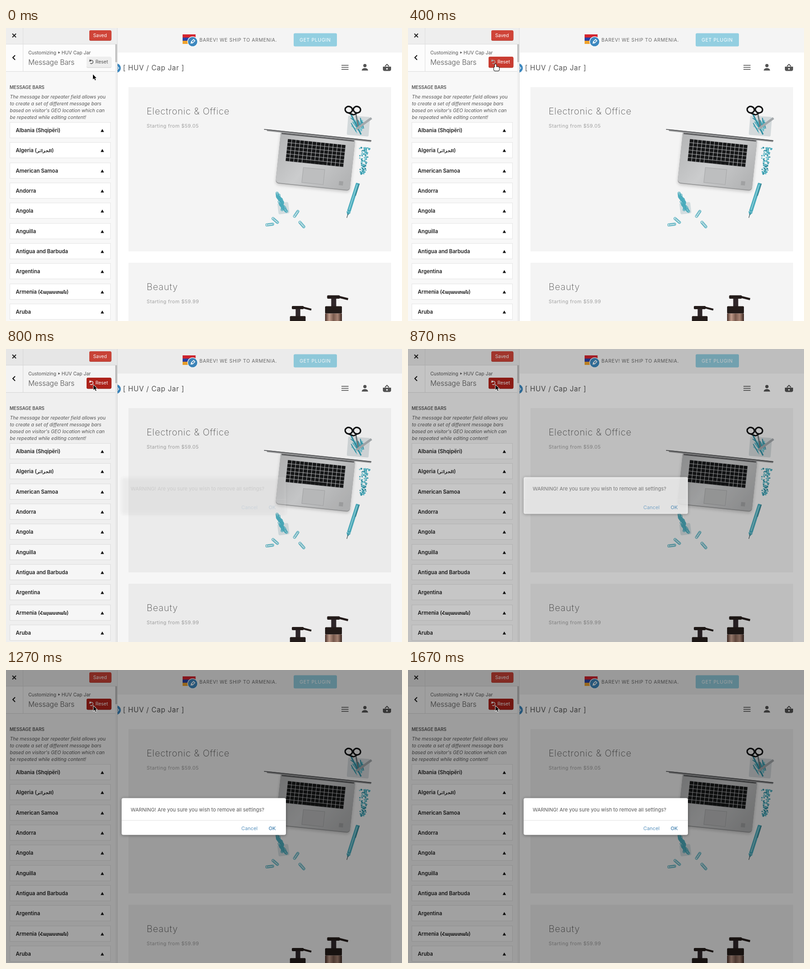
These frames come from a looping animation (870 px wide and 644 px high, 1740 ms). An HTML page with a canvas:

```html
<!DOCTYPE html>
<html lang="en">
<head>
<meta charset="utf-8">
<title>Message bars reset</title>
<style>
html, body { margin: 0; width: 100%; height: 100%; overflow: hidden; background: #fff; }
canvas { display: block; width: 870px; height: 644px; }
</style>
</head>
<body>
<canvas id="stage" width="870" height="644"></canvas>
<script>
const ctx = document.getElementById('stage').getContext('2d');
const W = 870, H = 644, SIDE = 245, LOOP = 1740, TICK = 1000 / 15;
const FONT = 'Inter, "Noto Sans", "DejaVu Sans", sans-serif';
const INK = '#555', TEALS = ['#2f8fa2', '#4aabbc', '#7cc6d1'];

const clamp = v => Math.max(0, Math.min(1, v));
const lerp = (a, b, k) => a + (b - a) * k;
const easeOut = k => 1 - (1 - clamp(k)) ** 1.6;
const easeInOut = k => (1 - Math.cos(Math.PI * clamp(k))) / 2;

function seeded(seed) {
  return () => (seed = (seed * 16807) % 2147483647) / 2147483647;
}

// Drawing helpers

function text(str, x, y, size, color = INK, weight = 400, spacing = 0) {
  ctx.font = `${weight} ${size}px ${FONT}`;
  ctx.letterSpacing = spacing + 'px';
  ctx.fillStyle = color;
  ctx.fillText(str, x, y);
  return x + ctx.measureText(str).width;
}

function rect(x, y, w, h, color, r = 0) {
  ctx.beginPath();
  ctx.roundRect(x, y, w, h, r);
  ctx.fillStyle = color;
  ctx.fill();
}

function line(x1, y1, x2, y2, color, width = 1) {
  ctx.beginPath();
  ctx.moveTo(x1, y1);
  ctx.lineTo(x2, y2);
  ctx.strokeStyle = color;
  ctx.lineWidth = width;
  ctx.stroke();
}

function oval(x, y, rx, ry, color, from = 0) {
  ctx.beginPath();
  ctx.ellipse(x, y, rx, ry, 0, from, Math.PI * 2);
  ctx.fillStyle = color;
  ctx.fill();
}

const disc = (x, y, r, color) => oval(x, y, r, r, color);

function at(x, y, angle, draw, scale = 1) {
  ctx.save();
  ctx.translate(x, y);
  ctx.rotate(angle);
  ctx.scale(scale, scale);
  draw();
  ctx.restore();
}

// Points along +x before rotation.
function triangle(x, y, r, angle, color) {
  at(x, y, angle, () => {
    ctx.beginPath();
    ctx.moveTo(r, 0);
    ctx.lineTo(-r * 0.7, -r);
    ctx.lineTo(-r * 0.7, r);
    ctx.fillStyle = color;
    ctx.fill();
  });
}

function chevron(x, y, r, angle, color, width) {
  at(x, y, angle, () => {
    ctx.beginPath();
    ctx.moveTo(-r / 2, -r);
    ctx.lineTo(r / 2, 0);
    ctx.lineTo(-r / 2, r);
    ctx.strokeStyle = color;
    ctx.lineWidth = width;
    ctx.stroke();
  });
}

function shadow(blur, dy, alpha, draw) {
  ctx.save();
  ctx.shadowColor = `rgba(0,0,0,${alpha})`;
  ctx.shadowBlur = blur;
  ctx.shadowOffsetY = dy;
  draw();
  ctx.restore();
}

function gradient(x, y, ...colors) {
  const g = ctx.createLinearGradient(0, 0, x, y);
  colors.forEach((c, i) => g.addColorStop(i / (colors.length - 1), c));
  return g;
}

// Sidebar

const countries = [
  ['Albania (Shqipëri)'], ['Algeria', 'الجزائر'], ['American Samoa'], ['Andorra'],
  ['Angola'], ['Anguilla'], ['Antigua and Barbuda'], ['Argentina'],
  ['Armenia', 'Հայաստան'], ['Aruba']
];

const notes = [
  'The message bar repeater field allows you',
  'to create a set of different message bars',
  "based on visitor's GEO location which can",
  'be repeated while editing content!'
];

function countryRow([name, native], i) {
  const y = Math.round(207 + i * 44.35), base = y + 21.5;
  rect(8, y, 222, 35, '#e4e4e4');
  rect(9, y + 1, 220, 33, '#fff');
  let x = text(native ? name + ' (' : name, 21.5, base, 11.3, '#222', 600);
  if (native) {
    x = text(native, x, base, 9.8, '#222', 700);
    text(')', x, base, 11.3, '#222', 600);
  }
  triangle(211.6, y + 18.8, 3.7, -Math.PI / 2, '#111');
}

function resetButton(tick) {
  const hover = tick >= 4, pressed = tick >= 10;
  const [face, edge] = pressed ? ['#b3231b', '#8f1b14'] : hover ? ['#c93c31', '#a93429'] : ['#eee', '#cfcfcf'];
  rect(177, 64, 54.5, 23.5, edge, 3);
  rect(177, 63, 54.5, 23.5, face, 3);
  const shade = lerp(85, 255, hover ? clamp((tick - 3) / 6) : 0);
  const color = `rgb(${shade},${shade},${shade})`;
  ctx.beginPath();
  ctx.arc(187.5, 74.5, 3.7, -2.3, 2.3);
  ctx.strokeStyle = color;
  ctx.lineWidth = 1.5;
  ctx.stroke();
  triangle(184.6, 72, 2.8, 2.4, color);
  text('Reset', 196.5, 77.7, 10.4, hover ? '#fff' : INK);
}

function sidebar(tick) {
  rect(0, 0, SIDE, H, '#f8f8f8');
  rect(0, 0, SIDE, 35, '#eee');
  rect(0, 36, 240, 59, '#fcfcfc');
  [35, 95].forEach(y => rect(0, y, SIDE, 1, '#dcdcdc'));
  rect(37, 0, 1, 95, '#dedede');
  [1, -1].forEach(s => line(14, 16.5 - 4 * s, 22, 16.5 + 4 * s, '#222', 2));
  chevron(17.5, 65, 5, Math.PI, '#111', 2);

  text('Customizing', 49, 57.5, 10.45);
  triangle(116.5, 54, 2.4, 0, INK);
  text('HUV Cap Jar', 122, 57.5, 10.45);
  text('Message Bars', 49, 80.5, 15.4, INK, 300);
  rect(183, 6, 48.5, 22, '#b33a30', 3);
  rect(183, 5, 48.5, 22, '#cf4438', 3);
  text('Saved', 191.5, 20.2, 10.3, '#fff');
  resetButton(tick);

  text('MESSAGE BARS', 8, 134, 9.8, INK, 600);
  notes.forEach((s, i) => text(s, 8.5, 155.3 + i * 14.8, 10.42, INK, 'italic 400'));
  countries.forEach(countryRow);

  rect(240, 36, 5, H, '#f0f0f0');
  rect(240, 36, 4, 39, '#c4c4c4');
  rect(244, 0, 1, H, '#dcdcdc');
}

// Store header

function badge(x, y) {
  disc(x, y, 11.5, '#fff');
  disc(x, y, 10.3, '#3d88bf');
}

function topBar() {
  rect(SIDE, 0, W, 54, '#f4f4f4');
  ['#d3252f', '#2a42a5', '#f0a32c'].forEach((c, i) => rect(388, 14 + i * 7, 28.5, 7, c));
  badge(410, 30);
  at(410, 30, Math.PI * 0.75, () => {
    ctx.strokeStyle = '#fff';
    ctx.strokeRect(-5, -2, 7, 4);
    triangle(4, 0, 2.5, 0, '#fff');
  });
  text('BAREV! WE SHIP TO ARMENIA.', 425, 29.7, 10.3, '#666', 400, 0.7);
  rect(632, 11.5, 95, 29, '#93cfe1', 3);
  text('GET PLUGIN', 645, 29.7, 10.3, '#fff', 400, 0.7);
}

function header() {
  badge(242, 88);
  chevron(246.5, 88, 3, 0, '#fff', 1.3);
  text('[ HUV / Cap Jar ]', 257, 93, 15.2, INK, 400, 0.7);
  for (let y = 82; y < 92; y += 4.5) line(737, y, 752.5, y, INK, 1.6);
  disc(788.5, 82.6, 3.6, INK);
  oval(788.5, 93.5, 7, 5.5, INK, Math.PI);
  rect(828, 85, 18, 9.5, INK, [0, 0, 4, 4]);
  chevron(837, 82, 4.5, -Math.PI / 2, INK, 1.8);
  disc(837, 89.8, 1.8, '#fff');
}

function card(y, h, title, price) {
  rect(269, y, 577, h, '#f4f4f4');
  text(title, 309, y + 60, 20, INK, 200, 0.8);
  text('Starting from ' + price, 309, y + 88.6, 10.8, '#a2a2a2', 400, 0.45);
}

// Product pictures

function laptop() {
  ctx.save();
  ctx.transform(1, 0.104, -0.107, 1, 604, 229);
  shadow(7, 3, 0.2, () => rect(0, 0, 163, 112, '#8f9091', [0, 0, 7, 7]));
  rect(0, 0, 163, 110.5, gradient(150, 100, '#b4b5b6', '#cbcccd', '#b3b4b5'), [0, 0, 7, 7]);
  rect(2, 1, 159, 3, '#5c5d5f');
  const kw = 127.5 / 14, kh = 49 / 6;
  rect(16.5, 13, 14 * kw, 6 * kh, '#909193');
  for (let r = 0; r < 6; r++) {
    for (let c = 0; c < 14; c++) {
      const space = r === 5 && c > 3 && c < 9;
      rect(17 + c * kw, 13.5 + r * kh, space ? kw : kw - 1.3, kh - 1.3, '#161718', 0.8);
    }
  }
  rect(56.5, 71, 48, 34, '#a5a6a7');
  rect(57.5, 72, 46, 32, '#bdbebf');
  rect(138, 93, 9, 9, '#a0a1a2');
  ctx.restore();

  at(567, 222, 0.105, () => {
    rect(6, 0, 231, 4, '#9a9b9c', 2);
    rect(0, 0, 237, 1.6, '#4d4e50');
  });
}

function penCup() {
  const rnd = seeded(31);
  at(752, 192, 0.08, () => rect(0, 0, 48, 43, 'rgba(200,208,211,.75)', 3));
  for (let i = 0; i < 26; i++) {
    const x = 757 + rnd() * 28, y = 196 + rnd() * 20;
    line(x, y, lerp(x, 777, 0.6) + rnd() * 8, y + 10 + rnd() * 10, TEALS[i % 3], 1.7);
  }
  line(757, 188, 780, 234, TEALS[0], 3);
  line(768, 186, 774, 216, '#6d777b', 3);
  line(803, 198, 770, 222, '#a4a9ac', 5);
  for (const x of [753, 771]) {
    ctx.beginPath();
    ctx.ellipse(x, 179.5, 8, 7, 0.2, 0, 7);
    ctx.strokeStyle = '#121314';
    ctx.lineWidth = 3.2;
    ctx.stroke();
    line(x, 187, 764, 191, '#121314', 3);
  }
}

function beads() {
  const rnd = seeded(77);
  for (let i = 0; i < 110; i++) {
    const k = rnd() ** 1.2, spread = 13 - 6 * k;
    const x = lerp(789, 783, k) + (rnd() + rnd() - 1) * spread;
    disc(x, lerp(263, 321, k), 1.1 + rnd() * 0.9, TEALS[i % 3]);
  }
}

function pen() {
  at(773, 341, 1.88, () => {
    rect(0, -4, 66, 8, TEALS[1], 2);
    triangle(70, 0, 5, 0, TEALS[1]);
    line(3, 0.5, 62, 0.5, '#8bd0da', 2);
    line(0, -3.5, 28, -3.5, '#2d7885', 1.6);
    line(70, 0, 80, 0, '#5a666a', 1.4);
  });
}

function clip(x, y, angle, len = 18) {
  at(x, y, angle, () => {
    ctx.strokeStyle = TEALS[1];
    ctx.lineWidth = 1.1;
    ctx.beginPath();
    ctx.roundRect(-len / 2, -2.7, len, 5.4, 2.7);
    ctx.roundRect(-len / 2 + 3, -1.2, len - 5, 2.6, 1.3);
    ctx.stroke();
  });
}

function clips() {
  const rnd = seeded(12);
  at(596, 385, -0.12, () => rect(0, 0, 24, 25, 'rgba(200,214,217,.75)', 3));
  for (let i = 0; i < 16; i++) {
    const k = i / 15;
    clip(lerp(596, 609, k) + rnd() * 5, lerp(367, 400, k), 0.6 + rnd() * 1.5, 13);
  }
  clip(579.5, 432, -0.12);
  clip(591.5, 423, 0.72);
  clip(637.5, 408.5, -0.98);
  clip(650, 432, 0.85);
}

function bottle(x, y, scale) {
  const dark = '#241c1a';
  at(x, y, 0, () => {
    rect(-14, 0, 28, 7.5, dark, 2);
    line(10, 3, 32, 8.5, dark, 4.5);
    rect(-5, 7, 11, 18, '#30272a');
    rect(-18.5, 24, 37, 16, dark, 2);
    ctx.translate(-18.5, 40);
    rect(0, 0, 37, 30, gradient(37, 0, '#4a3028', '#c09c8b', '#7a5b4e', '#a88575', '#3b2620'));
  }, scale);
}

function store() {
  rect(SIDE, 0, W, H, '#fff');
  header();
  topBar();
  card(130, 361, 'Electronic & Office', '$59.05');
  card(516, 128, 'Beauty', '$59.99');
  laptop();
  penCup();
  beads();
  pen();
  clips();
  bottle(719.5, 587.5, 1);
  bottle(641, 611, 0.93);
}

// Overlay

function dialog(alpha) {
  ctx.save();
  ctx.globalAlpha = alpha;
  shadow(6, 1, 0.4, () => rect(254, 281.5, 361, 81, '#fff', 4));
  rect(254, 330, 361, 1, '#e2e2e2');
  text('WARNING! Are you sure you wish to remove all settings?', 274, 311, 11);
  text('Cancel', 517, 351.5, 10.9, '#5b93bf');
  text('OK', 577, 351.5, 10.9, '#3f7fae', 500);
  ctx.restore();
}

function outlined(fill, edge, width) {
  ctx.lineJoin = 'round';
  ctx.strokeStyle = edge;
  ctx.lineWidth = width;
  ctx.stroke();
  ctx.fillStyle = fill;
  ctx.fill();
}

function hand() {
  ctx.beginPath();
  ctx.roundRect(-1.5, 0, 3.2, 11, 1.6);
  ctx.roundRect(-3.5, 6, 11.5, 8.5, 3);
  outlined('#fff', '#111', 2);
}

function arrow() {
  ctx.beginPath();
  ctx.moveTo(0, 0);
  ctx.lineTo(0, 11);
  ctx.lineTo(2.7, 8.5);
  ctx.lineTo(4.6, 13);
  ctx.lineTo(6.3, 12.3);
  ctx.lineTo(4.4, 8);
  ctx.lineTo(7.7, 8);
  ctx.closePath();
  outlined('#000', '#fff', 1.8);
}

function cursor(tick) {
  const k = easeInOut((tick - 0.5) / 6);
  at(lerp(191, 192.3, k), lerp(102, 79, k), 0, tick >= 4 && tick < 11 ? hand : arrow);
}

function render(tick) {
  const fade = easeOut((tick - 11.83) * 0.373);
  store();
  sidebar(tick);
  rect(0, 0, W, H, `rgba(0,0,0,${0.37 * fade})`);
  dialog(easeOut(fade));
  cursor(tick);
}

const start = performance.now();
let shown = -1;
function loop() {
  // The picture steps at 15 per second, aligned to 10 ms.
  const t = (performance.now() - start) % LOOP;
  const tick = Math.floor((t + 4) / TICK);
  if (tick !== shown) render(shown = tick);
  requestAnimationFrame(loop);
}
loop();
</script>
</body>
</html>
```
